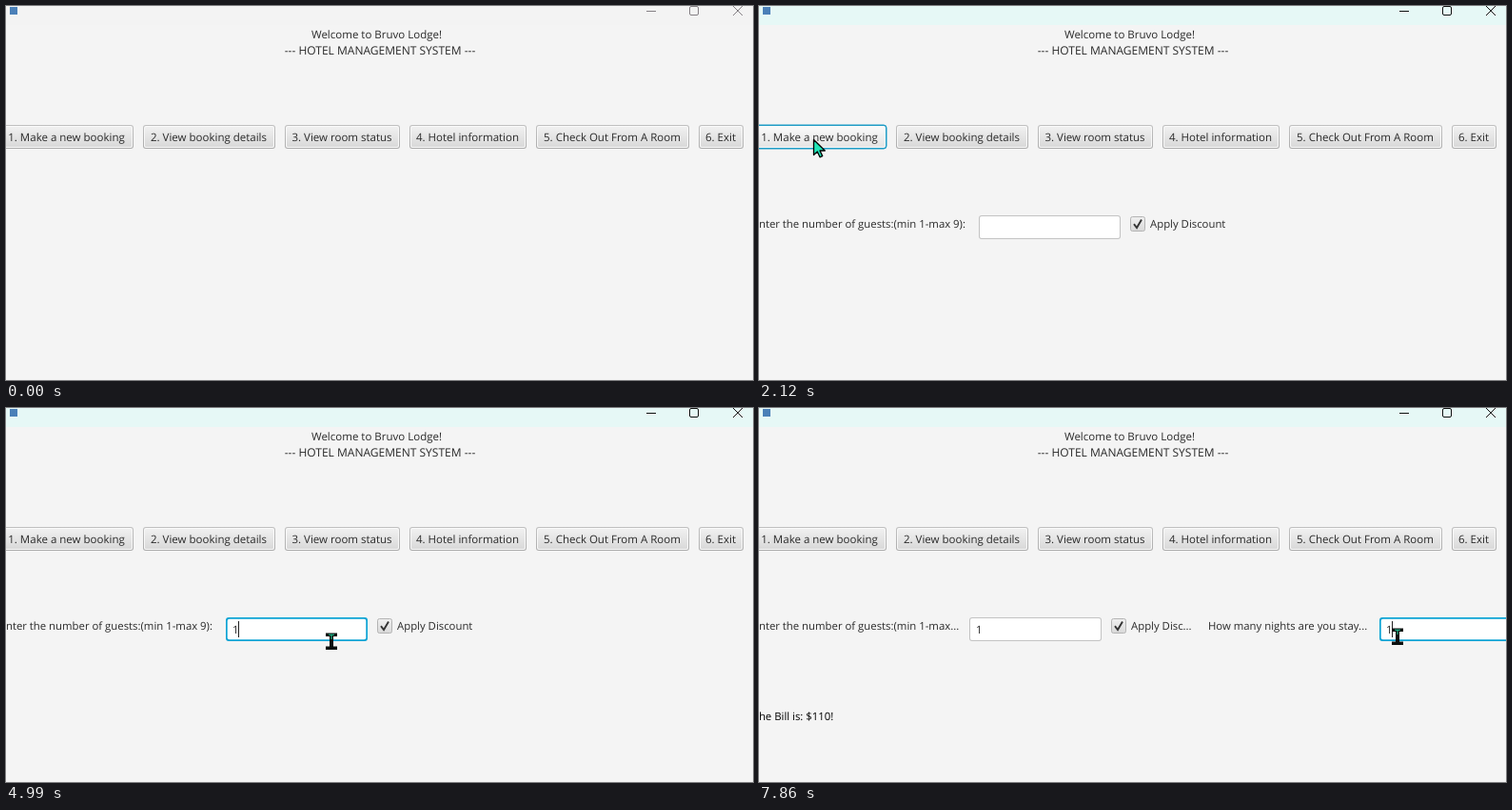
An HTML page for the animation above (8000 ms loop, 785x393 px).

```html
<!DOCTYPE html>
<html lang="en">
<head>
<meta charset="utf-8">
<title>Hotel booking</title>
<style>
  html, body { margin: 0; width: 100%; height: 100%; overflow: hidden; background: #f4f4f4; }
  svg { display: block; }
  text { font: 11.5px "Open Sans", "Noto Sans", sans-serif; fill: #2a2a2a; text-rendering: geometricPrecision; white-space: pre; }
  .mid { text-anchor: middle; }
  .label { font-size: 11.35px; }
  .wide { font-size: 12px; }
</style>
</head>
<body>
<svg width="785" height="393" viewBox="0 0 785 393">
  <defs>
    <linearGradient id="idle" x2="0" y2="1"><stop stop-color="#f0f0f0"/><stop offset="1" stop-color="#d9d9d9"/></linearGradient>
    <linearGradient id="hover" x2="0" y2="1"><stop stop-color="#fafafa"/><stop offset="1" stop-color="#e4e4e4"/></linearGradient>
    <linearGradient id="edge" x2="0" y2="1"><stop stop-color="#c0c0c0"/><stop offset="1" stop-color="#acacac"/></linearGradient>
  </defs>
  <rect width="785" height="393" fill="#f4f4f4"/>
  <rect id="bar" width="785" height="20"/>
  <rect x="4" y="1" width="8" height="8" fill="#4b80b8"/>
  <g id="controls" fill="none">
    <path d="M673 5.5h10M764 0l10 10M774 0l-10 10"/>
    <rect x="718.5" y=".5" width="9" height="9" rx="1.5"/>
  </g>
  <text class="mid" x="389.5" y="34">Welcome to Bruvo Lodge!</text>
  <text class="mid wide" x="393" y="51">--- HOTEL MANAGEMENT SYSTEM ---</text>
  <g id="buttons"></g>
  <g id="form">
    <text id="ask" class="label" x="-6.4" y="233"></text>
    <g id="check">
      <rect x=".5" y="221.5" width="15" height="15" rx="2" fill="url(#idle)" stroke="#b4b4b4"/>
      <path d="M4 229.2L7 233 12 224.5" fill="none" stroke="#333" stroke-width="1.9"/>
      <text id="discount" class="label" x="21" y="233"></text>
    </g>
    <g id="fields"></g>
    <text id="stay" class="label" x="472" y="233">How many nights are you stay...</text>
    <rect id="caret" y="224" width="1" height="17"/>
  </g>
  <text id="bill" class="label" x="-6.4" y="328" style="fill:#000">The Bill is: $110!</text>
  <path id="arrow" d="M.5.5V16.5L4.3 13 7 18.8 9.7 17.6 7 12H12.3Z" fill="#1fe6b8" stroke="#000" stroke-width="1.3" stroke-linejoin="round"/>
  <g id="beam">
    <path d="M-6-8.5H6V-5H2V5.5H6V9H-6V5.5H-2V-5H-6Z" fill="#0a0f0e"/>
    <path d="M-3-6.8H3M0-7V-2" stroke="#1fd09c"/>
  </g>
</svg>
<script>
const LOOP = 8000, CAPTURE = 143.27, BLINK = 500;

// When things happen, in ms
const WHEN = { press: 1840, open: 1980, guests: 3200, typeGuests: 4930, squeeze: 5140, nights: 6430, typeNights: 7580, bill: 7860 };

// Pointer moves: each eases on from the end of the one before, along a curve
const ENTRY = { x: 876, y: 473 };
const MOVES = [
  { start: -280, end: 840, x: 60, y: 141, bend: 0 },
  { start: 1750, end: 1980, x: 57, y: 140, bend: 0 },
  { start: 2270, end: 2840, x: 290, y: 241, bend: 110 },
  { start: 2840, end: 3700, x: 342, y: 245, bend: 0 },
  { start: 5580, end: 6290, x: 671, y: 240, bend: -52 }
];

const $ = id => document.getElementById(id);
const ease = p => p * p * (3 - 2 * p);
const inside = (p, x, y, w, h) => p.x >= x && p.x < x + w && p.y >= y && p.y < y + h;

function set(el, attrs) {
  for (const k in attrs) el.setAttribute(k, attrs[k]);
}
function add(parent, tag, attrs, text = "") {
  const el = document.createElementNS("http://www.w3.org/2000/svg", tag);
  set(el, attrs);
  el.textContent = text;
  parent.append(el);
  return el;
}
const show = (el, on) => set(el, { display: on ? "inline" : "none" });

function pointerAt(t) {
  let p = ENTRY;
  for (const m of MOVES) {
    if (t < m.start) break;
    const u = ease(Math.min(1, (t - m.start) / (m.end - m.start)));
    p = {
      x: p.x + (m.x - p.x) * u,
      y: p.y + (m.y - p.y) * u + 2 * u * (1 - u) * m.bend
    };
  }
  return p;
}

// A row of buttons, each 10px after the last
let left = -6;
const buttons = Object.entries({
  "Make a new booking": 140, "View booking details": 139, "View room status": 121,
  "Hotel information": 123, "Check Out From A Room": 161, "Exit": 47
}).map(([label, w], i) => {
  const g = add($("buttons"), "g", {}), x = left;
  const edge = add(g, "rect", { x, y: 125, width: w, height: 25, rx: 3 });
  add(g, "rect", { x: x + 1, y: 126, width: w - 2, height: 23, rx: 2, fill: "#f9f9f9" });
  const face = add(g, "rect", { x: x + 2, y: 127, width: w - 4, height: 21, rx: 1.5 });
  add(g, "text", { class: "mid", x: x + w / 2 - .5, y: 142 }, `${i + 1}. ${label}`);
  left += w + 10;
  return { x, w, edge, face };
});

function makeField() {
  const g = add($("fields"), "g", {});
  return {
    g,
    box: add(g, "rect", { y: 220, height: 25, rx: 3 }),
    fill: add(g, "rect", { rx: 2, fill: "#fff" }),
    value: add(g, "text", { y: 237 }, "1")
  };
}
const guests = makeField(), nights = makeField();

function paintField(f, x, w, focused, filled) {
  const d = focused ? 1.7 : 1;
  set(f.box, { x, width: w, fill: focused ? "#0ba3d4" : "#c3c3c3" });
  set(f.fill, { x: x + d, y: 220 + d, width: w - 2 * d, height: 25 - 2 * d });
  set(f.value, { x: x + 7 });
  show(f.value, filled);
}

function render(t) {
  const past = key => t >= WHEN[key];
  const p = pointerAt(t);
  const active = past("press"), tight = past("squeeze"), second = past("nights");

  set($("bar"), { fill: active ? "#e6f8f6" : "#f3f3f3" });
  set($("controls"), { stroke: active ? "#111" : "#858085" });

  buttons.forEach((b, i) => {
    const focused = i === 0 && active && !past("guests");
    const over = inside(p, b.x, 125, b.w, 25);
    set(b.edge, focused
      ? { fill: "#1f9cc6", stroke: "#1f9cc6" }
      : { fill: "url(#edge)", stroke: "none" });
    set(b.face, { fill: over ? "url(#hover)" : "url(#idle)" });
  });

  // The first question shrinks to make room for the second
  const x = tight ? 221 : 231, w = tight ? 139 : 149;
  show($("form"), past("open"));
  $("ask").textContent = "Enter the number of guests:(min 1-max" + (tight ? "..." : " 9):");
  $("discount").textContent = tight ? "Apply Disc..." : "Apply Discount";
  set($("check"), { transform: `translate(${x + w + 10} 0)` });
  paintField(guests, x, w, past("guests") && !second, past("typeGuests"));
  paintField(nights, 652, w, second, past("typeNights"));
  show($("stay"), tight);
  show(nights.g, tight);

  // The caret blinks anew after each click or key
  const edits = ["guests", "typeGuests", "nights", "typeNights"].filter(past);
  const last = edits.at(-1), typed = edits.length % 2 === 0;
  show($("caret"), last && (t - WHEN[last]) % (2 * BLINK) < BLINK);
  set($("caret"), { x: (second ? 652 : x) + (typed ? 13 : 7), fill: typed ? "#222" : "#888" });
  show($("bill"), past("bill"));

  const isBeam = past("open") && (inside(p, x, 220, w, 26) || tight && inside(p, 652, 220, w, 26));
  show($("arrow"), !isBeam);
  show($("beam"), isBeam);
  set($(isBeam ? "beam" : "arrow"), { transform: `translate(${Math.round(p.x)} ${Math.round(p.y)})` });
}

function tick() {
  const t = performance.now() % LOOP;
  render(Math.floor((t + 30) / CAPTURE) * CAPTURE - 10);
  requestAnimationFrame(tick);
}
tick();
</script>
</body>
</html>
```
